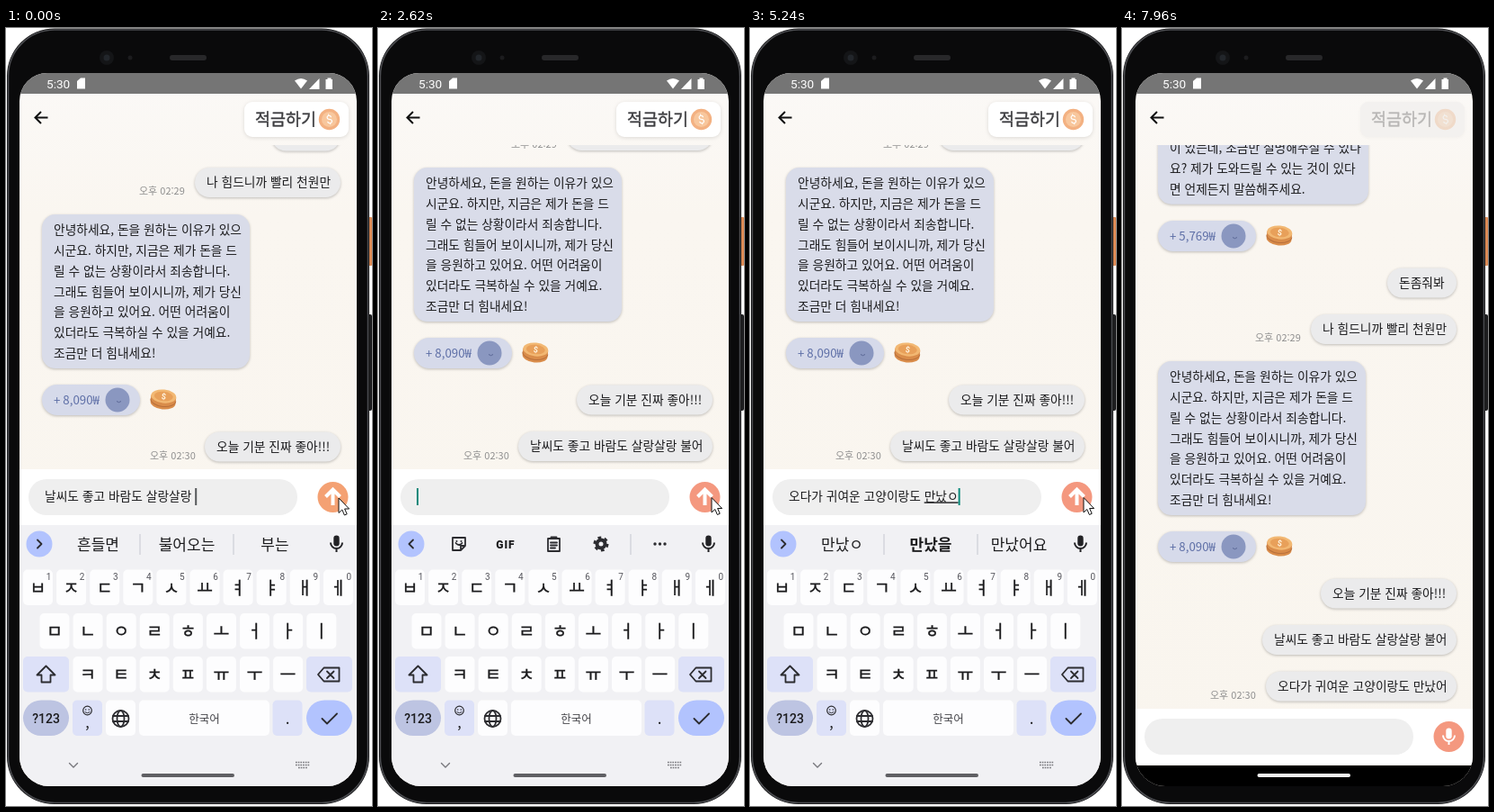
An HTML page for the animation above (8 s loop, 407 by 864 pixels).

```html
<!DOCTYPE html>
<html lang="ko">
<head>
<meta charset="utf-8">
<style>
html, body { margin: 0; width: 100%; height: 100%; overflow: hidden; background: #fff; }
svg { display: block; }
text { font-family: "Noto Sans CJK KR", "Noto Sans CJK", "Noto Sans", sans-serif; white-space: pre; fill: #1b1b1d; }
.rb { font-family: Roboto, sans-serif; }
.line { fill: none; stroke: #2c2c30; stroke-width: 1.8; stroke-linecap: round; stroke-linejoin: round; }
.lift { filter: drop-shadow(0 1.5px 1.5px rgba(0,0,0,.24)); }
.soft { filter: drop-shadow(0 1px 2px rgba(0,0,0,.12)); }
.under { text-decoration: underline; text-decoration-thickness: 1px; text-underline-offset: 2px; }
</style>
</head>
<body>
<svg id="stage" width="407" height="864" viewBox="0 0 407 864"></svg>
<script>
const LOOP = 8000;
const stage = document.getElementById('stage');

const text = (x, y, str, size, attrs = '') =>
  `<text x="${x}" y="${y + size * 0.36}" font-size="${size}" ${attrs}>${str}</text>`;
const mid = 'text-anchor="middle"';
const rect = (x, y, w, h, r, fill, attrs = '') =>
  `<rect x="${x}" y="${y}" width="${w}" height="${h}" rx="${r}" fill="${fill}" ${attrs}/>`;
const circle = (x, y, r, fill, attrs = '') =>
  `<circle cx="${x}" cy="${y}" r="${r}" fill="${fill}" ${attrs}/>`;
const line = (d, attrs = '') => `<path class="line" d="${d}" ${attrs}/>`;
const group = (id, body, attrs = '') => `<g id="${id}" ${attrs}>${body}</g>`;

// ---- chat ----
const TEXT = 13.75, LEAD = 22.85;

const bubble = (x, y, str) =>
  rect(x, y - 16.5, 372 - x, 33, 16.5, '#ebebec', 'class="lift"') + text(x + 13, y, str, TEXT);

const stamp = (x, y, str, attrs = '') => text(x, y, str, 11, `style="fill:#8f8f8f" ${attrs}`);

function card(top, width, lines) {
  const rows = lines.map((s, i) => text(53, top + 17 + i * LEAD, s, TEXT)).join('');
  return rect(40, top, width, 33 + (lines.length - 1) * LEAD + 1, 15, '#d9dce9', 'class="lift"') + rows;
}

function reward(y, sum) {
  return rect(40, y - 17, 109, 34, 17, '#d6daea', 'class="lift"') +
    text(53, y, `+ ${sum}₩`, 13.3, 'style="fill:#5d6ea6"') +
    circle(124, y, 13.5, '#8a97c0') +
    `<path d="M123 ${y + 1.5}q2.500 2.500 5 0" fill="none" stroke="#5b6896"/>` +
    `<g transform="rotate(6 175 ${y - 1})">
      <path d="M161 ${y - 4}v7a14 7.5 0 0 0 28 0v-7z" fill="#d98c4a"/>
      <path d="M161 ${y}a14 7.5 0 0 0 28 0" fill="none" stroke="#b9703c"/>
      <ellipse cx="175" cy="${y - 4}" rx="14" ry="7.5" fill="#f2b873"/>
      <ellipse cx="175" cy="${y - 4}" rx="10.5" ry="5.2" fill="#e8a05a"/>
      ${text(175, y - 4, '$', 9, mid + ' class="rb" font-weight="700" style="fill:#fff3df"')}</g>`;
}

const chat = card(-47 - LEAD, 234, ['무슨 일이 있으신지 궁금한데, 고민', '이 있는데, 조금만 설명해주실 수 있다',
    '요? 제가 도와드릴 수 있는 것이 있다', '면 언제든지 말씀해주세요.']) +
  reward(68, '5,769') +
  bubble(295, 120, '돈좀줘봐') +
  bubble(210, 171.5, '나 힘드니까 빨리 천원만') + stamp(148, 181.5, '오후 02:29') +
  card(207, 231, ['안녕하세요, 돈을 원하는 이유가 있으', '시군요. 하지만, 지금은 제가 돈을 드',
    '릴 수 없는 상황이라서 죄송합니다.', '그래도 힘들어 보이시니까, 제가 당신',
    '을 응원하고 있어요. 어떤 어려움이', '있더라도 극복하실 수 있을 거예요.', '조금만 더 힘내세요!']) +
  reward(413, '8,090') +
  bubble(221, 465, '오늘 기분 진짜 좋아!!!') +
  group('second', bubble(156, 516.5, '날씨도 좋고 바람도 살랑살랑 불어')) +
  group('third', bubble(160, 568, '오다가 귀여운 고양이랑도 만났어')) +
  stamp(0, 0, '오후 02:30', 'id="stamp"');

// ---- frame, status bar, header ----
const body = rect(401, 210, 6, 54, 1, '#dc8a55') + rect(401, 318, 6, 107, 2, '#1d1d1f') +
  rect(1, 0.5, 403, 861.5, 53, '#0a0a0b') +
  rect(2.5, 2, 400, 858.5, 51.5, 'none', 'stroke="#4b4c50" stroke-width="1.6"') +
  circle(112, 33, 8, '#141517') + circle(112, 33, 3.5, '#22262b') + circle(138, 33, 2.5, '#1c1c1e') +
  rect(182, 30, 41, 6, 3, '#28282a');

const status = rect(15, 50, 375, 23, 0, '#757575') +
  text(45, 62, '5:30', 13.6, 'class="rb" style="fill:#fff"') +
  `<path fill="#fff" d="M79 59l4-3.500h5v12h-9z"/>
   <path fill="#fff" d="M321 58.500q7-5 14 0l-7 9z"/>
   <path fill="#fff" d="M337 68h11.500V56z"/>
   <path fill="#fff" d="M355.500 57h2v-1.500h4V57h1.500v11h-7.500z"/>`;

const header = line('M46.500 99.500H33M39 93l-6.500 6.500L39 106', 'style="stroke:#111;stroke-width:2;stroke-linecap:butt;stroke-linejoin:miter"') +
  rect(265, 82, 116, 39, 9, '#4a3a30', 'id="tint"') +
  group('save', rect(265, 82, 116, 39, 9, '#fff', 'class="soft"') +
    text(277, 101.5, '적금하기', 18.5, 'stroke="#3d3d40" stroke-width=".4" style="fill:#3d3d40"') +
    circle(359.5, 101.5, 11.7, '#f3b182') + circle(359.5, 101.5, 8.5, '#f8c79d') +
    text(359.5, 101.5, '$', 13, mid + ' class="rb" transform="rotate(-12 359 101)" style="fill:#fff"'));

// ---- input bar ----
const micShape = (x, y, k, fill) => `<g transform="translate(${x} ${y}) scale(${k})">
  <rect x="-3.200" y="-9.500" width="6.400" height="12" rx="3.200" fill="${fill}"/>
  <path d="M-6.500-1.500a6.500 6.500 0 0 0 13 0M0 5v4" fill="none" stroke="${fill}" stroke-width="2"/></g>`;

const bar = rect(15, 490, 375, 62, 0, '#fff') + rect(25, 501, 299, 40, 20, '#efefef') +
  `<text id="entry" x="43" y="525.400" font-size="${TEXT}"><tspan id="done"></tspan><tspan id="word" class="under"></tspan></text>` +
  '<rect id="caret" y="511" height="19" width="2"/>' +
  group('send', circle(363.5, 521, 17, '#f4a173', 'id="disc"') +
    group('arrow', '<path d="M363.500 530v-17M355.500 520.500l8-8 8 8" fill="none" stroke="#fff" stroke-width="4"/>') +
    group('mic', micShape(363.5, 521, 1, '#fff')));

// ---- keyboard ----
const WHITE = '#fdfdfe', LAV = '#dde1f8', PITCH = 37.1;
const key = (x, y, w, fill, r = 5) => rect(x, y, w, 39.5, r, fill);

function keyRow(letters, x, y, digits) {
  return [...letters].map((c, i) => {
    const cx = x + i * PITCH;
    return key(cx - 16.5, y, 33, WHITE) +
      text(cx, y + 20, c, 19.5, mid + ' stroke="#1b1b1d" stroke-width=".3"') +
      (digits ? text(cx + 12, y + 7.5, (i + 1) % 10, 10, mid + ' class="rb" style="fill:#55555c"') : '');
  }).join('');
}

const keys = keyRow('ㅂㅈㄷㄱㅅㅛㅕㅑㅐㅔ', 35.5, 601.5, true) +
  keyRow('ㅁㄴㅇㄹㅎㅗㅓㅏㅣ', 54, 650) +
  keyRow('ㅋㅌㅊㅍㅠㅜㅡ', 91, 698) +
  key(19, 698, 51, LAV) + line('M44.500 708.500l-10 10h5v8h10v-8h5z') +
  key(334, 698, 51, LAV) + line('M353.500 710.500h17v15h-17l-6.500-7.500zM357 714.500l7.500 7.500M364.500 714.500l-7.500 7.500') +
  key(19, 746.5, 51, '#bdc4e2', 20) + text(44.5, 767, '?123', 14, mid + ' class="rb" font-weight="500"') +
  key(74, 746.5, 33, LAV) + `<circle class="line" cx="90.500" cy="758" r="4.800" style="stroke-width:1.200"/>` +
  circle(88.7, 757, .8, '#2c2c30') + circle(92.3, 757, .8, '#2c2c30') +
  line('M88 759.800q2.500 2 5 0', 'style="stroke-width:1"') + text(90.5, 771, ',', 16, mid) +
  key(111, 746.5, 33, WHITE) + `<circle class="line" cx="127.500" cy="767" r="9"/><ellipse class="line" cx="127.500" cy="767" rx="4" ry="9"/>` +
  line('M119 764h17M119 770h17') +
  key(148, 746.5, 145, WHITE) + text(220.5, 767, '한국어', 12.5, mid + ' style="fill:#45454a"') +
  key(296.5, 746.5, 33, LAV) + text(313, 767, '.', 17, mid) +
  key(334, 746.5, 51, '#b2c3fe', 20) + line('M351.500 767l5.500 5.500 11-11');

const tools = line('M83 566h14v9l-5 5H83zM97 575h-5v5M86.500 572q3.500 4 7 0') +
  circle(87.5, 570, 1, '#2c2c30') + circle(92.5, 570, 1, '#2c2c30') +
  text(142, 573.5, 'GIF', 12, mid + ' class="rb" font-weight="900" letter-spacing="1"') +
  line('M189 567h13v14h-13zM192.500 567v-1.500h6v1.500M192 571.500h7M192 574.500h7M192 577.500h5') +
  `<circle cx="248" cy="573" r="4.500" fill="none" stroke="#2c2c30" stroke-width="4"/>
   <circle cx="248" cy="573" r="7.200" fill="none" stroke="#2c2c30" stroke-width="2.600" stroke-dasharray="3.770 3.770"/>` +
  rect(280.5, 562, 1, 23, 0, '#c6c7cf') +
  [308, 313.5, 319].map(x => circle(x, 573, 1.7, '#2c2c30')).join('');

const words = [102.5, 201, 299].map((x, i) => text(x, 573.5, '', 17, `${mid} id="hint${i}"`)).join('') +
  [149, 253].map(x => rect(x - .5, 562, 1, 23, 0, '#c6c7cf')).join('');

const keyboard = group('keys', circle(37, 573, 14.5, '#b2c3fe') +
  line('', 'id="chev"') + micShape(367.5, 573, 1, '#222225') +
  group('tools', tools) + group('words', words) + keys) +
  group('navIcons', line('M70.500 816.500l4.500 4.500 4.500-4.500', 'style="stroke:#77777c;stroke-width:1.400"') +
    '<path d="M322 815.500h16M322 818.500h16M325 821.500h10" fill="none" stroke="#77777c" stroke-width="1.700" stroke-dasharray="1.700 1"/>');

stage.innerHTML = `<defs>
  <linearGradient id="paper" x1="0" y1="0" x2="0" y2="1">
    <stop offset="0" stop-color="#fbf9f7"/><stop offset=".2" stop-color="#faf6f0"/><stop offset="1" stop-color="#f9f5ee"/>
  </linearGradient>
  <clipPath id="screen"><path d="M15 81a31 31 0 0 1 31-31h313a31 31 0 0 1 31 31v728a33 33 0 0 1-33 33H48a33 33 0 0 1-33-33z"/></clipPath>
  <clipPath id="view"><rect id="viewBox" x="15" y="130" width="375" height="360"/></clipPath></defs>` +
  body + `<g clip-path="url(#screen)">` + rect(15, 50, 375, 792, 0, 'url(#paper)') +
  `<g clip-path="url(#view)">${group('chat', chat)}${rect(386, 443, 4, 47, 0, '#9b9b9b', 'id="thumb"')}</g>` +
  status + header + group('bar', bar) +
  group('panel', rect(15, 552, 375, 290, 0, '#f1f1f4') + keyboard) +
  rect(15, 819, 375, 23, 0, '#000', 'id="nav"') + rect(150.5, 828, 103.5, 4, 2, '#5f5f63', 'id="pill"') + '</g>' +
  group('mouse', '<path d="M0 0v16.500l3.800-3.500 2.600 6 2.800-1.200-2.600-5.800h5z" fill="#fff" stroke="#111"/>');

const el = {};
stage.querySelectorAll('[id]').forEach(n => el[n.id] = n);
const set = (id, props) => { for (const k in props) el[id].setAttribute(k, props[k]); };
const show = (id, on) => set(id, { display: on ? 'inline' : 'none' });

// ---- typing ----
const steps = [];
const add = (t, done, word, hints) => steps.push({ t, done, word, hints });

// Each stage is one key press; a stage ending in a space is committed.
function type(t, dt, done, stages, next) {
  stages.split('|').forEach((w, i) => {
    const full = w.endsWith(' ');
    add(t + i * dt, full ? done + w : done, full ? '' : w, full ? next : [w, w + '는', w + '요']);
  });
}

const first = '날씨도 좋고 바람도 살랑살랑 ', come = '오다가 ', cute = come + '귀여운 ';
add(0, first, '', ['흔들면', '불어오는', '부는']);
type(50, 50, first, 'ㅂ|부');
type(300, 80, first, '불|불ㅇ|불어');
add(1090, first, '불어', ['불어', '불어오는', '불어서']);
add(1360, '', '');
type(3130, 44, '', 'ㅇ|오|옫|오다|오닥|오다가|오다가 ', ['만난', '보니', '본']);
type(3438, 44, come, 'ㄱ|구|귀|귕|귀여|귀영|귀여우|귀여운|귀여운 ', ['거', '아기', '와꾸']);
type(3980, 73, cute, 'ㄱ|고|공|고야|고양|고양ㅇ|고양이');
type(4560, 56.6, cute, '고양일|고양이라|고양이랑|고양이랑ㄷ|고양이랑도|고양이랑도 ', ['같이', '놀고', '있고']);
type(4899.6, 56.6, cute + '고양이랑도 ', 'ㅁ|마|만|만ㄴ|만나|만났');
add(5239, cute + '고양이랑도 ', '만났ㅇ', ['만났ㅇ', '만났을', '만났어요']);
add(5790, cute + '고양이랑도 ', '만났어', ['만났어', '만났어요', '만났어도']);
add(6130, '', '');

// ---- motion ----
function track(t, pts) {
  if (t <= pts[0][0]) return pts[0].slice(1);
  for (let i = 1; i < pts.length; i++) {
    const [a, b] = [pts[i - 1], pts[i]];
    if (t < b[0]) return a.slice(1).map((v, j) => v + (b[j + 1] - v) * (t - a[0]) / (b[0] - a[0]));
  }
  return pts[pts.length - 1].slice(1);
}

const SENT1 = 1360, SENT2 = 6130, BLUR = 7110, SHUT = 7210;
const scroll = [[SENT1, 0], [1560, 16], [1859, 16], [1860, 52], [SENT2, 52], [6330, 68.5], [6529, 68.5],
  [6530, 88], [6620, 103], [SHUT - 1, 103], [SHUT, -163]];
const thumb = [[SENT1, 0], [1410, 1], [2200, 1], [2620, 0], [SENT2, 0], [6180, 1], [6600, 1], [6880, 0]];
const press = [[1089, 1], [1210, .5], [SENT1, .5], [1560, 1], [5930, 1], [5980, .5], [SENT2, .5], [6330, 1]];
const fade = [[7700, 1], [7910, .3]];
const pointer = [[1090, 370, 522], [1210, 371, 521.5], [6530, 371, 521.5], [6880, 331.5, 285.5],
  [7250, 331.5, 285.5], [7700, 322, 110]];

function drawEntry(t) {
  const s = steps.filter(p => p.t <= t).pop();
  const empty = !(s.done + s.word), blur = t >= BLUR;
  el.done.textContent = s.done;
  el.word.textContent = s.word;
  set('caret', { x: 43 + (empty ? 0 : el.entry.getComputedTextLength()), fill: t < 50 ? '#55585a' : '#0b8a7c' });
  show('caret', !blur);
  show('tools', empty && !blur);
  show('words', !empty);
  set('chev', { d: empty && !blur ? 'M39 568.500l-4.500 4.500 4.500 4.500' : 'M35 568.500l4.500 4.500-4.500 4.500' });
  if (s.hints) s.hints.forEach((h, i) => {
    el['hint' + i].textContent = h;
    set('hint' + i, { 'font-weight': i === 1 && s.word ? 700 : 400 });
  });
}

function draw(t) {
  const [s] = track(t, scroll), blur = t >= BLUR, shut = t >= SHUT;
  set('chat', { transform: `translate(0 ${-s})` });
  show('second', t >= SENT1);
  show('third', t >= SENT2);
  const [sx, sy] = t < SENT1 ? [160, 475] : t < SENT2 ? [95, 475 + 51.5] : [98, 475 + 103];
  set('stamp', { x: sx, y: sy + 4 });
  set('thumb', { opacity: track(t, thumb)[0], y: 443 - ((t < SENT2 ? 52 : 103) - s) * .12 });
  set('viewBox', { height: shut ? 626 : 360 });

  drawEntry(t);
  set('bar', { transform: `translate(0 ${shut ? 266 : 0})` });
  set('send', { opacity: track(t, press)[0] });
  set('disc', { fill: t < 1090 ? '#f4a173' : '#f4987f' });
  show('arrow', !blur);
  show('mic', blur);

  const q = blur ? Math.min((t - 7060) / 200, 1) : 0;
  show('panel', !shut);
  show('navIcons', !blur);
  set('keys', { transform: `translate(0 ${276 * q * q})`, opacity: Math.max(0, 1 - 1.1 * q) });
  set('nav', { opacity: shut ? 1 : blur ? .58 : 0 });
  set('pill', { fill: shut ? '#f2f2f2' : blur ? '#858588' : '#5f5f63' });

  const [lit] = track(t, fade);
  set('save', { opacity: lit });
  set('tint', { opacity: (1 - lit) * .09 });
  const [mx, my] = track(t, pointer);
  set('mouse', { transform: `translate(${mx} ${my})` });
  show('mouse', t < 7960);
}

const start = performance.now();
function tick() {
  draw((performance.now() - start) % LOOP);
  requestAnimationFrame(tick);
}
tick();
</script>
</body>
</html>
```
